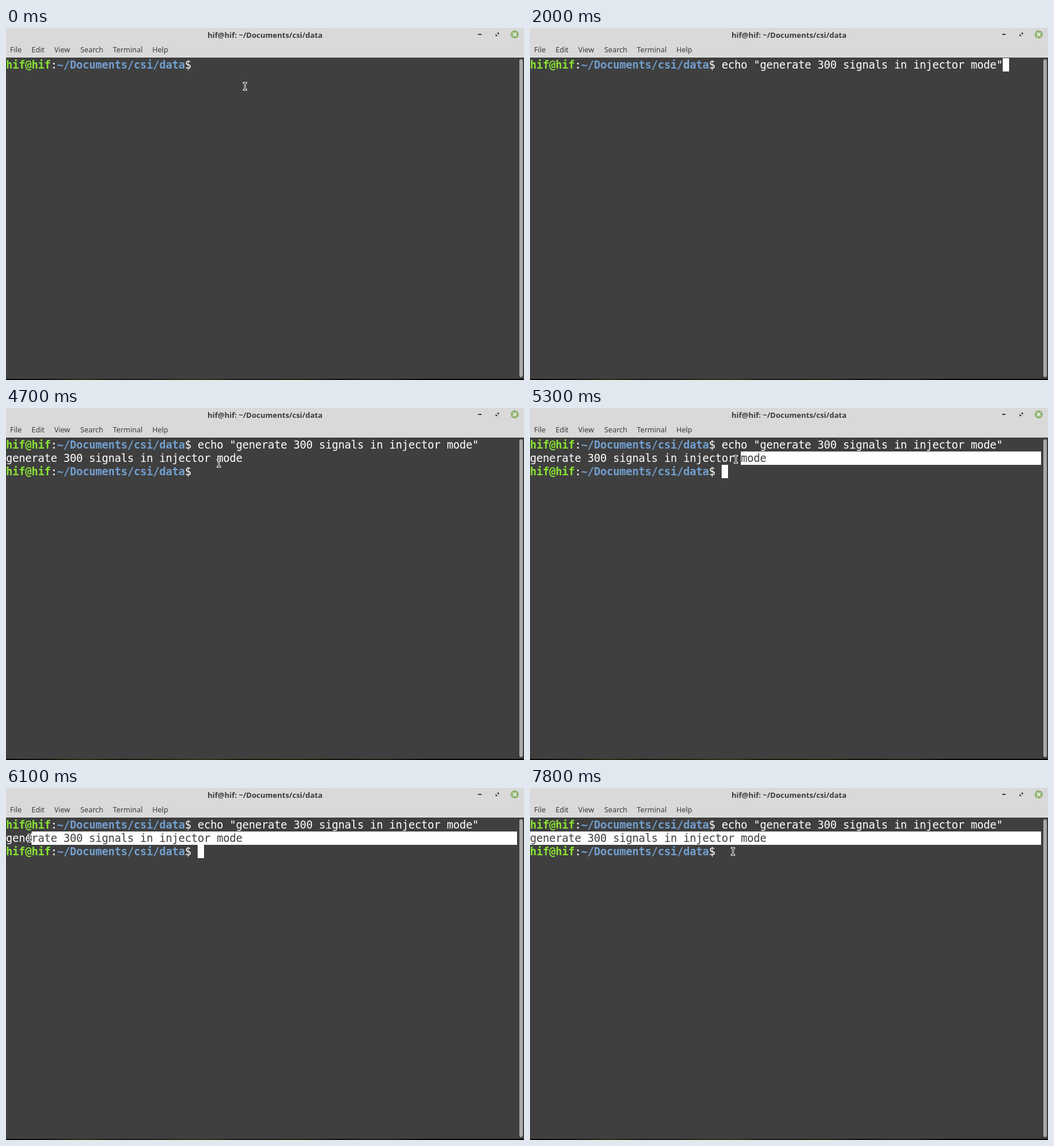
Write an HTML page with a canvas that moves like this. It is 892 px wide and 607 px high and loops after 8000 ms.

```html
<!DOCTYPE html>
<html lang="en">
<head>
<meta charset="utf-8">
<title>Terminal</title>
<style>
  html, body { margin: 0; width: 100%; height: 100%; overflow: hidden; background: #3f3f3f; }
  canvas { display: block; }
</style>
</head>
<body>
<canvas id="stage" width="892" height="607"></canvas>
<script>
const ctx = document.getElementById('stage').getContext('2d');
const LOOP = 8000;
const CELL_W = 11, CELL_H = 23, TOP = 52, ASCENT = 18, COLS = 80;
const BACK = '#3f3f3f', CHROME = '#d9d9d9', INK = '#3c3c3c', WHITE = '#ffffff';
const MONO = '18.667px "DejaVu Sans Mono", monospace';
const SANS = '"Noto Sans", sans-serif';

const USER = 'hif@hif', PATH = '~/Documents/csi/data';
const PROMPT_COLS = USER.length + PATH.length + 3;
const OUTPUT = 'generate 300 signals in injector mode';

// Shell history recalled line by line: [start time, command]
const HISTORY = [
  [0, ''],
  [400, 'clear'],
  [500, 'ls'],
  [600, 'cd data'],
  [700, 'echo "read the signals found in logger mode and save them to the data folder"'],
  [1200, 'echo "use virtual sdr in logger mode to parse the 300 signals generated above"'],
  [1600, 'echo "run the virtual sdr in injector mode to add new signals to the data"'],
  [2000, `echo "${OUTPUT}"`]
];
const ENTER = 3600, BLINK = 600, DRAG = 5200;

// Mouse path: [time, x, y]
const PATH_KEYS = [
  [4200, 212, 60], [4700, 366, 95], [5000, 433, 88], [5100, 433, 88],
  [5700, 197, 89], [6000, 52, 87], [6400, 3, 84], [6700, 3, 84],
  [6900, 499, 171], [7000, 499, 171], [7600, 349, 109]
];

function rect(x, y, w, h, color) {
  ctx.fillStyle = color;
  ctx.fillRect(x, y, w, h);
}

function label(text, x, y, font, align = 'left') {
  ctx.font = font;
  ctx.textAlign = align;
  ctx.fillStyle = INK;
  ctx.fillText(text, x, y);
}

// Writes on the character grid, wrapping at the last column.
function write(text, col, row, color, bold = false) {
  ctx.font = (bold ? 'bold ' : '') + MONO;
  ctx.textAlign = 'left';
  ctx.fillStyle = color;
  [...text].forEach((ch, i) => {
    const n = col + i;
    const y = TOP + (row + Math.floor(n / COLS)) * CELL_H + ASCENT;
    ctx.fillText(ch, (n % COLS) * CELL_W, y);
  });
}

function prompt(row) {
  write(USER, 0, row, '#8ae234', true);
  write(':', USER.length, row, WHITE);
  write(PATH, USER.length + 1, row, '#729fcf', true);
  write('$', PROMPT_COLS - 2, row, WHITE);
}

function block(col, row) {
  const y = TOP + (row + Math.floor(col / COLS)) * CELL_H;
  rect((col % COLS) * CELL_W, y, CELL_W, CELL_H, WHITE);
}

function mouseAt(t) {
  if (t < 400) return [411, 100];
  if (t < PATH_KEYS[0][0]) return null;
  const next = PATH_KEYS.findIndex(key => key[0] > t);
  if (next < 0) return PATH_KEYS[PATH_KEYS.length - 1].slice(1);
  const [t0, x0, y0] = PATH_KEYS[next - 1];
  const [t1, x1, y1] = PATH_KEYS[next];
  const k = (t - t0) / (t1 - t0);
  return [Math.round(x0 + (x1 - x0) * k), Math.round(y0 + (y1 - y0) * k)];
}

function drawMouse([x, y]) {
  const beam = (grow, color) => {
    const bar = (bx, by, w, h) =>
      rect(bx - grow, by - grow, w + 2 * grow, h + 2 * grow, color);
    bar(x - 2, y - 6, 5, 1);
    bar(x, y - 6, 1, 13);
    bar(x - 2, y + 6, 5, 1);
  };
  beam(1, WHITE);
  beam(0, '#000000');
}

// The selection trails the mouse slightly.
function selectionStart(t) {
  if (t < DRAG) return COLS;
  if (t >= 6400) return 0;
  return Math.round(mouseAt(t - 20)[0] / CELL_W);
}

function triangle(points) {
  ctx.fillStyle = INK;
  ctx.beginPath();
  points.forEach(([x, y]) => ctx.lineTo(x, y));
  ctx.fill();
}

function drawWindow() {
  rect(0, 0, 892, 607, BACK);
  rect(0, 0, 892, 51, CHROME);
  label(`${USER}: ${PATH}`, 446, 17, `600 13px ${SANS}`, 'center');
  const menu = { File: 7, Edit: 44, View: 83, Search: 128, Terminal: 184, Help: 252 };
  for (const name in menu) label(name, menu[name], 42, `12.5px ${SANS}`);

  rect(813, 10, 6, 2, INK);
  triangle([[845, 8], [849, 8], [849, 12]]);
  triangle([[843, 10], [843, 14], [847, 14]]);
  ctx.fillStyle = '#92b372';
  ctx.beginPath();
  ctx.arc(876, 11, 7, 0, Math.PI * 2);
  ctx.fill();
  ctx.strokeStyle = WHITE;
  ctx.lineWidth = 1.6;
  ctx.beginPath();
  for (const d of [-3, 3]) {
    ctx.moveTo(876 - d, 8);
    ctx.lineTo(876 + d, 14);
  }
  ctx.stroke();

  ctx.fillStyle = '#a9a9a9';
  ctx.beginPath();
  ctx.roundRect(884, 54, 6, 548, 3);
  ctx.fill();

  const strip = ctx.createLinearGradient(0, 0, 892, 0);
  [[0, '#060604'], [0.08, '#0c1206'], [0.15, '#2c2e12'], [0.22, '#12180a'],
   [0.3, '#1c2410'], [0.39, '#33351a'], [0.45, '#141a0a'], [0.57, '#1e260e'],
   [0.64, '#0e1206'], [0.73, '#1a2010'], [0.8, '#070705'], [1, '#050504']
  ].forEach(([at, color]) => strip.addColorStop(at, color));
  rect(0, 605, 892, 2, strip);
}

function draw(time) {
  const t = Math.floor(time / 100) * 100;
  const command = HISTORY.filter(entry => entry[0] <= t).pop()[1];
  drawWindow();
  prompt(0);
  write(command, PROMPT_COLS, 0, WHITE);

  if (t < ENTER) {
    const lit = t >= 400 && (t < 2000 || Math.floor((t - 2000) / BLINK) % 2 === 0);
    if (lit) block(PROMPT_COLS + command.length, 0);
  } else {
    const from = selectionStart(t);
    rect(from * CELL_W, TOP + CELL_H, (COLS - from) * CELL_W, CELL_H, WHITE);
    write(OUTPUT.slice(0, from), 0, 1, WHITE);
    write(OUTPUT.slice(from), from, 1, BACK);
    prompt(2);
    if (Math.floor((t - ENTER) / BLINK) % 2 === 0) block(PROMPT_COLS, 2);
  }

  const mouse = mouseAt(t);
  if (mouse) drawMouse(mouse);
}

let start;
function tick(now) {
  start ??= now;
  draw(Math.max(0, now - start) % LOOP);
  requestAnimationFrame(tick);
}
draw(0);
requestAnimationFrame(tick);
</script>
</body>
</html>
```
